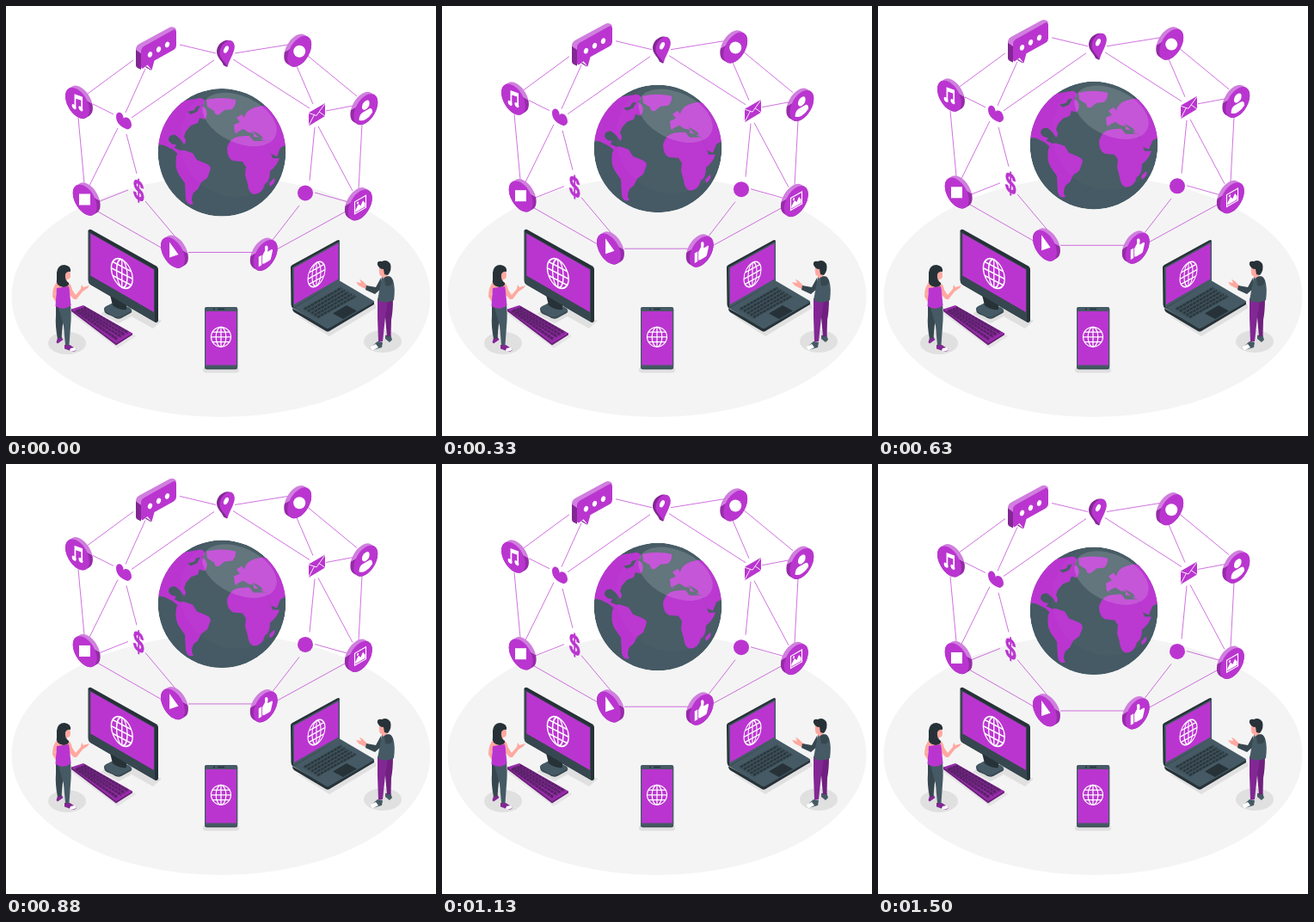
Animation, 500 px wide and 500 px high, one loop 1.54 s. Source, as an HTML page:

```html
<!DOCTYPE html>
<html lang="en">
<head>
<meta charset="utf-8">
<title>Connected world</title>
<style>
  html, body { margin: 0; width: 100%; height: 100%; overflow: hidden; background: #fff; }
  svg { display: block; width: 100%; height: 100%; }
  .float { animation: rise 770ms linear -40ms infinite alternate; }
  @keyframes rise { to { transform: translateY(-10px); } }
  .p { fill: #ba35d0; }
  .pd { fill: #822793; }
  .pl { fill: #d07fde; }
  .g { fill: #455a64; }
  .gd { fill: #37474f; }
  .k { fill: #263238; }
  .w { fill: #fff; }
  .s { fill: #e0e0e0; }
  .skin { fill: #ffa8a0; }
  .line { fill: none; stroke: #ba35d0; stroke-width: .7; }
  .ink { fill: none; stroke: #fff; }
  .cash { font: bold 33px "Liberation Sans", Arial, sans-serif; text-anchor: middle; stroke: #ba35d0; stroke-width: .9; }
</style>
</head>
<body>
<svg viewBox="0 0 500 500" xmlns="http://www.w3.org/2000/svg">
  <defs>
    <linearGradient id="rim" gradientUnits="userSpaceOnUse" x1="0" y1="-10" x2="0" y2="-8">
      <stop offset=".4" stop-color="#d07fde"/>
      <stop offset=".6" stop-color="#962ba8"/>
    </linearGradient>
    <clipPath id="ball"><circle cx="251" cy="170.3" r="74.3"/></clipPath>
    <g id="disc">
      <path d="M0 0l4.600-4.600" stroke="url(#rim)" stroke-width="32.200" stroke-linecap="round"/>
      <circle class="p" r="16.100"/>
    </g>
    <g id="web" class="ink" stroke-width="1.25">
      <circle r="11.5"/>
      <ellipse rx="5.8" ry="11.5"/>
      <path d="M0-11.5V11.5M-11.5 0H11.5M-10-5.700H10M-10 5.700H10"/>
    </g>
  </defs>

  <ellipse cx="250" cy="338" rx="243.5" ry="140" fill="#f4f4f4"/>

  <!-- monitor and keyboard -->
  <g>
    <path class="s" d="M110 358L133 344 181 366 171 375 146 361 131 369Z"/>
    <path class="gd" d="M114 353Q114 350 119 348L128 344 144 352Q148 355 145 357L134 363Q129 365 124 361L117 358Q114 356 114 353Z"/>
    <path class="g" d="M114 352Q114 350 119 348L128 343 144 351Q148 354 145 355L134 361Q129 363 124 360L117 356Z"/>
    <path class="k" d="M121 336L140 346V353Q131 354 124 348Z"/>
    <path class="k" d="M95.500 261.500Q96 259 99 260L175 302.500Q177 304 177 306V366Q176 369 173 367.500L98 324Q95.500 322 95.500 319Z"/>
    <path class="gd" d="M96 262.500L173 306V367L98 323.500Q96 322 96 319Z"/>
    <path class="p" d="M98.300 264.500L172 306.500V356L98.300 313.500Z"/>
    <use href="#web" transform="matrix(1.080 .560 0 1.400 134.800 311)"/>
    <path class="s" d="M73 356L79 354 131 393 149 382 151 384 130 398Z" opacity=".7"/>
    <path fill="#6d1f7c" d="M76 352L128 391.500 147 380V382.500L128 394.500 76 355Z"/>
    <path fill="#962ba8" d="M76 352.500L90 348 147 380.500 128 392Z"/>
    <g fill="none" stroke="#5a2169" stroke-width="3.200" stroke-dasharray="3.700 .500">
      <path d="M90.500 350.500L142 380"/>
      <path d="M87 352L138 382.300"/>
      <path d="M83.500 353L134 384.600"/>
      <path d="M81 354.300L129.500 387.500"/>
    </g>
  </g>

  <!-- phone -->
  <g>
    <rect class="s" x="229" y="420" width="42" height="6.500" rx="3"/>
    <rect class="gd" x="231" y="350" width="38.200" height="72.500" rx="2.500"/>
    <rect class="g" x="231" y="350" width="38.200" height="71" rx="2.500"/>
    <rect class="p" x="232.300" y="355" width="35.600" height="62.500"/>
    <path d="M241 352.500H243M246 352.500H254" stroke="#263238" stroke-width="1.300"/>
    <use href="#web" x="250" y="384.800"/>
  </g>

  <!-- laptop -->
  <g>
    <path class="s" d="M338 360L376 384 431 351 428 345 374 373Z"/>
    <path class="k" d="M333 351.500L374 374 428 343.500V347L376 378Q374 379 372 378L335 356Q333 355 333 351.500Z"/>
    <path class="g" d="M333 351L388 319.500 427 342.500Q429 344 427 345L376 374.500Q374 375.500 372 374.500Z"/>
    <path fill="#40535c" d="M344 352.500L389.500 326.500 409 338 362.500 364Z"/>
    <g fill="none" stroke="#2b383f" stroke-width="2.600" stroke-dasharray="3.600 .800">
      <path d="M347 352.500L390 328"/>
      <path d="M351 355L394 330.500"/>
      <path d="M355 357.300L398 332.800"/>
      <path d="M358.500 359.600L402 335.100"/>
      <path d="M362 362L406 337.400"/>
    </g>
    <path class="k" d="M380 357.500L396 348 408 354.500 392 364Z"/>
    <path class="k" d="M331 304Q331 302 333 301L385 272.500Q388 271 388 274V319.500L334 351.500Q331.500 350 331.500 347Z"/>
    <path class="g" d="M333 304L388 273.500V319.500L334 351Z"/>
    <path class="p" d="M335 304.500L386.500 276V317.500L335 347Z"/>
    <use href="#web" transform="matrix(.870 -.480 0 1.180 361 312)"/>
  </g>

  <!-- woman -->
  <g>
    <ellipse class="s" cx="71" cy="392" rx="22" ry="13"/>
    <path class="pd" d="M60 386L64 384 66.500 388 60 392.500 58.500 391Z"/>
    <path class="pd" d="M68 394L74 394 82 399Q81 403 75 401L68 398.500Z"/>
    <path class="w" d="M75 398L80 397 82 399.500Q79 402.500 74 401Z"/>
    <path class="gd" d="M58 346H70Q69 361 66 370L64.500 386 60 387Q57 372 58 360Z"/>
    <path class="g" d="M60 347L75 346Q76 358 75.500 366L73.500 394 69 394.500 67 372Z"/>
    <path class="skin" d="M60 320Q54 326 54 338L59 346 61 343 57.500 335 62 327Z"/>
    <path class="skin" d="M60 320L72 321Q76 324 77 330L81 336 87 329 88 324 90 327 97 325 95 328 89 332 82 341 79 341 72 334H60Z"/>
    <path class="p" d="M59 328L73 326Q74 330 74 333 75 342 75.500 348 67 355 57.500 349 58 342 58.500 334Z"/>
    <path class="skin" d="M65 308H74Q76 314 74 317L71 318V322L65 321Z"/>
    <path class="k" d="M59 310Q60 301 68 301 76 302 75 309 71 308 69 312 68 319 73 322 74 326 67 327 57 325 59 318Z"/>
  </g>

  <!-- man -->
  <g>
    <ellipse class="s" cx="438" cy="390" rx="22" ry="13"/>
    <path class="g" d="M441 383L447 382 449 388 446 391 441 387Z"/>
    <path class="g" d="M432 390L438 391 437 397 428 399.500 424 397Z"/>
    <path class="w" d="M424 396L430 393 433 397 427 400Q424 399 424 396Z"/>
    <path fill="#70207f" d="M436 340L450 340Q450 355 448 365L447.500 384 443 384.500 441 362Z"/>
    <path class="pd" d="M432 340H444Q443 352 441 362L438 390 433 390.500 432 362Z"/>
    <path class="skin" d="M421 326L415 320 411 317.500 413 322 407 321 410 325 418 329Z"/>
    <path class="gd" d="M436 316L430 327 419 325 418 330 429 335 437 328Z"/>
    <path class="g" d="M437 315Q445 312 450 319 453 327 451 342 441 347 432 342 432 326Z"/>
    <path class="gd" d="M440 316Q448 311 450 320 449 327 441 325Z"/>
    <path class="skin" d="M434 304L443 303V314L438 317 437 314Q433 314 434 304Z"/>
    <path class="k" d="M432 301Q431 296 437 297 443 294 447 300 449 307 444 313L440 312 439 306Q434 306 432 301Z"/>
  </g>

  <g class="float">
   <g transform="translate(0 .5)">
    <path class="line" d="M148 63L95 102M202 45L244 55M162 73L139 124M266 55L328 45M242 63L146 130M264 62L353 119M338 70L357 114M351 58L408 105M372 122L404 116M101 114L125 126M84 130L91 206M130 142L97 209M140 149L152 195M109 227L142 214M105 238L182 282M162 227L199 271M212 286.500H287M313 284L395 239M310 272L341 232M359 217L398 228M353 203L359 141M363 140L403 215M414 137L410 213"/>

    <!-- globe -->
    <g clip-path="url(#ball)">
      <circle class="g" cx="251" cy="170.300" r="74.300"/>
      <g class="p">
        <path d="M172 152Q183 122 208 110L226 107Q235 109 228 116L232 119Q236 126 231 132L225 130 223 136 215 139 209 146 207 152Q211 158 207 161L203 155 197 150Q189 149 189 156 192 162 198 161L196 165 203 168 200 172 194 167 184 162 172 160Z"/>
        <path d="M198 175Q201 166 208 168L217 171 222 179 232 183Q240 186 237 192L234 200 227 205 223 213 218 217Q214 226 218 230 211 233 209 224L208 206 201 196Q196 188 198 175Z"/>
        <path d="M233 109Q250 105 267 109 268 115 263 120L254 121 248 126Q243 128 242 122L234 117Z"/>
        <path d="M265 138L272 135 268 130 274 126 277 130Q279 121 289 118L297 116 340 120V164L324 162 319 165 315 175 308 172 302 157 296 155 290 156 283 150 273 150 266 147Z"/>
        <path d="M257 165Q261 153 270 152L283 150 287 156 302 157 307 169 310 177 318 177Q315 186 307 192 307 204 301 207 298 219 288 219 282 217 281 207L278 196 279 187 275 181 264 180Q257 177 257 165Z"/>
        <path d="M306 206L312 200Q314 206 307 210Z"/>
      </g>
      <g class="g">
        <path d="M268 147L276 143 282 147 288 148 288 152 296 153 297 157 288 157 283 151 273 151Z"/>
        <path d="M286 145Q292 147 297 151L299 155 293 152Z"/>
        <path d="M211 123L219 121 221 117 226 116 222 123 215 126Z"/>
      </g>
      <circle cx="268" cy="156" r="66" fill="#fff" opacity=".015"/>
      <ellipse cx="271.500" cy="132" rx="46" ry="27" transform="rotate(25 271.500 132)" fill="#fff" opacity=".15"/>
    </g>

    <!-- speech bubble -->
    <path class="pd" d="M151 50L157 47V74L153 72Q151 71 151 69Z"/>
    <path class="pl" d="M151 51Q151 46 155 44L190 25Q195 23 198 27L158 56Z"/>
    <path class="pd" d="M163 70L169.500 74.500 168 74.500 162 71Z"/>
    <path class="p" d="M157 52Q157 49 160 47L194 28Q198 26 198 30V46Q198 49 195 51L172.500 63.500 169.500 74.500 164.500 68.500 160 72Q157 74 157 70Z"/>
    <g class="w">
      <ellipse cx="167.500" cy="56.500" rx="2.500" ry="3.400" transform="rotate(20 167.500 56.500)"/>
      <ellipse cx="177.500" cy="50.500" rx="2.500" ry="3.400" transform="rotate(20 177.500 50.500)"/>
      <ellipse cx="187.500" cy="45" rx="2.500" ry="3.400" transform="rotate(20 187.500 45)"/>
    </g>

    <!-- pin -->
    <path class="pd" d="M257 71L253 69C251 63 245 60 245 53 245 46 252 39 259 40L263 42Z"/>
    <path class="p" d="M257.500 71C256 65 248.500 62 248.500 55 248.500 47 255 40 260 40 265.500 40 267 47 265 52 263 59 259 64 257.500 71Z"/>
    <ellipse class="w" cx="256" cy="50.500" rx="2.500" ry="4.500" transform="rotate(25 256 50.500)"/>

    <!-- heart, dollar, plain dot -->
    <path class="p" d="M141.500 143.500C134 141.500 128 136 128 128.500 128 122 136 122 136.800 131 139 127.500 146 131 146 138.500Q146 142 141.500 143.500Z"/>
    <text class="cash p" transform="matrix(.680 .380 0 1 154.200 225.800)">$</text>
    <circle class="p" cx="348" cy="217.500" r="9"/>

    <!-- envelope -->
    <path class="p" d="M352 124L371 113V128L352 139.500Z"/>
    <path class="ink" d="M352 124.500L361 127.500 371 113.500M352 139L358.500 126.500M371 128L364 123" stroke-width=".9"/>

    <!-- discs facing left -->
    <g transform="matrix(.866 .5 0 1 83 112.900)">
      <use href="#disc"/>
      <g class="w">
        <path d="M-4-8.500L7-10.500V4H5V-5.500L-2-4.200V7H-4Z"/>
        <ellipse cx="-4.500" cy="6.500" rx="2.900" ry="2.600"/>
        <ellipse cx="4.500" cy="4.200" rx="2.900" ry="2.600"/>
      </g>
    </g>
    <use href="#disc" transform="matrix(.866 .5 0 1 91.700 225.700)"/>
    <rect class="w" x="85" y="218.500" width="13" height="13"/>
    <g transform="matrix(.866 .5 0 1 194 286.800)">
      <use href="#disc"/>
      <path class="w" d="M-4.500-10V8L7.500-1.500Z"/>
    </g>

    <!-- discs facing right -->
    <use href="#disc" transform="matrix(-.866 .5 0 1 341.200 52.800)"/>
    <use href="#disc" transform="matrix(-.866 .5 0 1 418.300 120.200)"/>
    <use href="#disc" transform="matrix(-.866 .5 0 1 411.800 231.400)"/>
    <use href="#disc" transform="matrix(-.866 .5 0 1 301.700 289.900)"/>
    <circle class="w" r="7" cx="341.200" cy="52.800"/>
    <g class="w" transform="matrix(.866 -.5 0 1 418.300 120.200)">
      <circle cy="-5" r="5"/>
      <path d="M-9 8Q-9 1.500-3.500 1.500H3.500Q9 1.500 9 8 5 11.500 0 11.500-5 11.500-9 8Z"/>
    </g>
    <g transform="matrix(.866 -.5 0 1 412 231)">
      <rect class="ink" x="-7.500" y="-7" width="15" height="14" stroke-width="1.300"/>
      <path class="w" d="M-6.500 5.500V3L-2.500-2 .5 1.500 3.500-3 6.500 1.500V5.500Z"/>
      <circle class="w" cx="-3.500" cy="-3.800" r="1.300"/>
    </g>
    <g class="w" transform="matrix(.866 -.5 0 1 302 290)">
      <rect x="-9.500" y="-3" width="4" height="11.500"/>
      <path d="M-4.500-2L-1-6V-11Q2.500-12 3-7.500L2.500-3H8Q10-2.500 9 0L7 7Q6.500 8.500 5 8.500H-2L-4.500 7.500Z"/>
    </g>
   </g>
  </g>
</svg>
</body>
</html>
```
